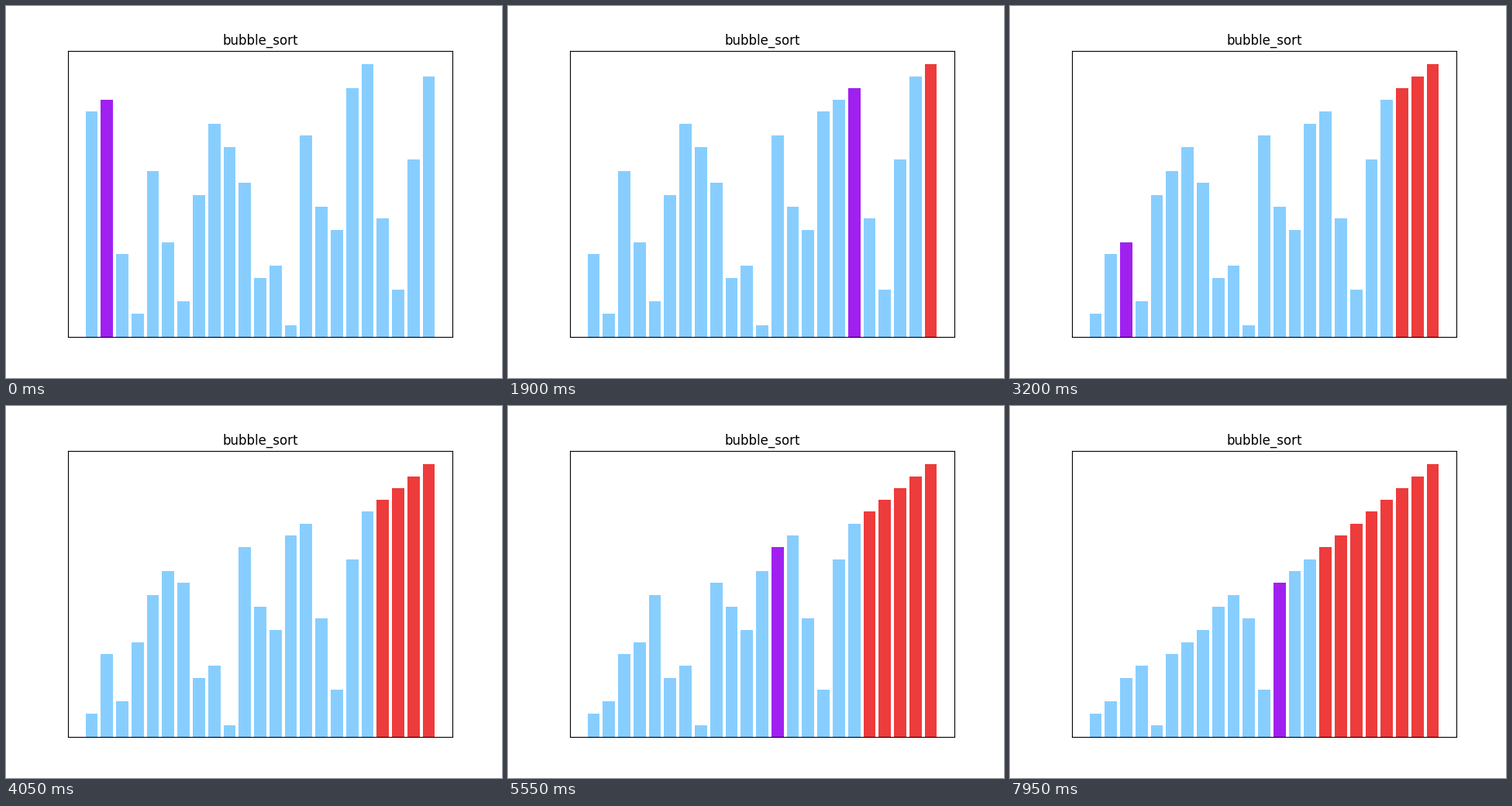
Recreate the animation shown at these times as a matplotlib script. Size 640 by 480 pixels, loop 8000 ms.

```python
import matplotlib.pyplot as plt
from matplotlib.animation import FuncAnimation

START = [19, 20, 7, 2, 14, 8, 3, 12, 18, 16, 13, 5,
         6, 1, 17, 11, 9, 21, 23, 10, 4, 15, 22]
FRAMES = 160
IDLE, ACTIVE, SORTED = "#87CEFF", "#A020F0", "#EE3B3B"


def bubble_steps(values):
    """Yield (values, active index, first sorted index) after each comparison."""
    values = list(values)
    for last in range(len(values) - 1, 0, -1):
        for j in range(last):
            if values[j] > values[j + 1]:
                values[j], values[j + 1] = values[j + 1], values[j]
            done = last if j + 1 == last else last + 1
            yield list(values), j + 1, done


steps = list(bubble_steps(START))

plt.rcParams["font.family"] = "DejaVu Sans"
fig, ax = plt.subplots(figsize=(6.4, 4.8), dpi=100)
bars = ax.bar(range(len(START)), START, color=IDLE)
ax.set_title("bubble_sort")
ax.set_xticks([])
ax.set_yticks([])


def draw(frame):
    values, active, done = steps[frame]
    for i, (bar, value) in enumerate(zip(bars, values)):
        bar.set_height(value)
        if i >= done:
            bar.set_facecolor(SORTED)
        else:
            bar.set_facecolor(ACTIVE if i == active else IDLE)
    return list(bars)


anim = FuncAnimation(fig, draw, frames=FRAMES, init_func=lambda: draw(0),
                     interval=50, repeat=True, repeat_delay=0)
plt.show()
```
